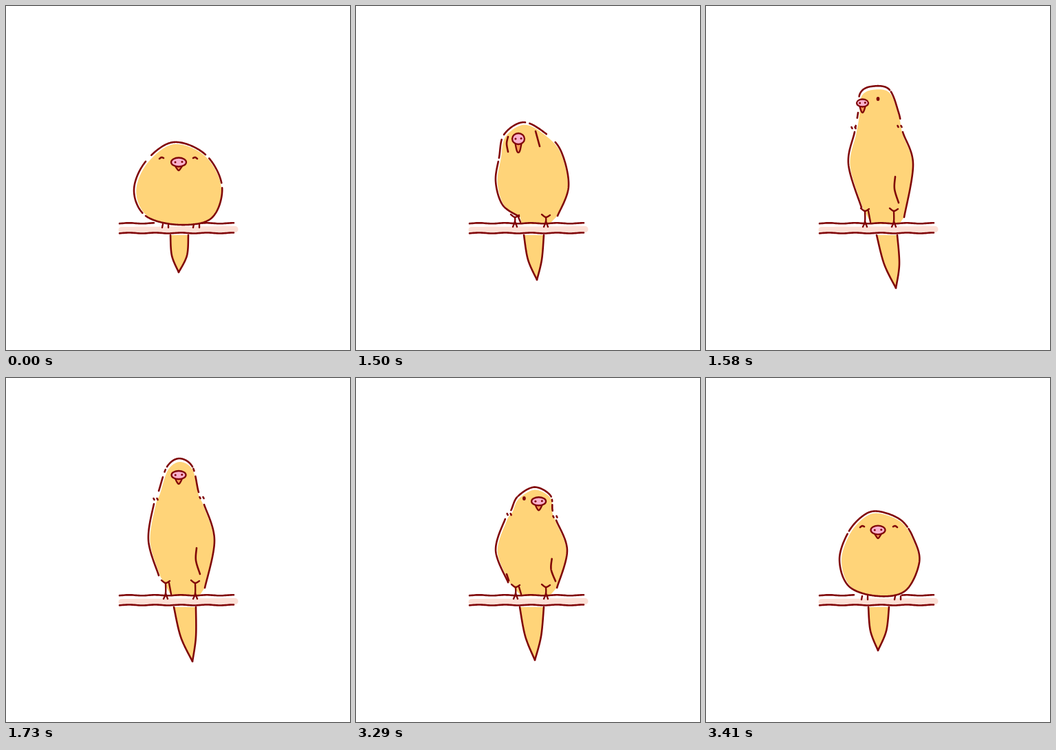
Write an HTML page with a canvas that moves like this. It is 500 px wide and 500 px high and loops after 3.47 s.

```html
<!DOCTYPE html>
<html lang="en">
<head>
<meta charset="utf-8">
<title>Stretching bird</title>
<style>
html, body { margin: 0; height: 100%; overflow: hidden; background: #fff; }
canvas { display: block; width: 100vw; height: 100vh; }
</style>
</head>
<body>
<canvas id="stage" width="500" height="500"></canvas>
<script>
const ctx = document.getElementById('stage').getContext('2d');
const INK = '#800608', YELLOW = '#ffd479', PINK = '#f9b0cd', ORANGE = '#f99d55', PERCH = '#fde0d6';
const LOOP = 3470;

// outline: knots clockwise from the left foot; gaps: breaks in the inked line, in knot units
// tail: top, middle, tip x, tip y, middle, top; beak: x, y, radii, tip length
const ball = {
  closed: true,
  outline: [203,305, 186,268, 203,226, 243,198, 290,216, 314,262, 299,308, 252,318],
  gaps: [0,.15, 2,2.25, 4,4.13, 4.9,5.03],
  tail: [239, 241, 251, 387, 263, 265],
  feet: [232, 277], brows: [226, 275, 221], beak: [251, 227, 11, 6.5, 12]
};
const crouch = {
  outline: [237,306, 213,289, 203,255, 208,220, 215,187, 243,169, 274,184, 298,211, 309,262, 293,305],
  gaps: [2.83,2.97, 3.75,4, 5.1,5.3, 6.12,6.6],
  tail: [244, 250, 263, 398, 270, 273],
  feet: [231, 276, 307], beak: [236, 193, 9, 8, 20],
  marks: [[221,190, 219,200, 221,212], [261,182, 264,193, 267,204]]
};
const side = {
  outline: [226,293, 207,230, 216,183, 221,155, 224,127, 240,117, 266,121, 280,155, 286,183, 301,230, 288,307],
  gaps: [2,2.2, 2.28,2.68, 3,3.8, 6.05,6.15, 7.33,8],
  tail: [248, 259, 276, 410, 281, 278],
  feet: [231, 273, 298], beak: [227.5, 141, 8.5, 5.5, 14],
  tufts: [214, 177, 281, 175], wing: [275, 248], eye: [250, 135]
};
const front = {
  outline: [222,287, 207,236, 215,183, 222,164, 234,129, 252,117, 271,129, 280,166, 288,184, 303,236, 289,305],
  gaps: [2,3, 3.55,3.75, 3.85,4, 6,6.1, 6.2,6.38, 7,8],
  tail: [244, 254, 271, 412, 276, 276],
  feet: [232, 275, 298], beak: [251, 141, 10.5, 6, 13],
  tufts: [217, 176, 284, 174], wing: [277, 247]
};
const turn = {
  outline: [223,294, 206,240, 219,187, 227,172, 236,149, 259,133, 281,147, 284,173, 289,189, 304,240, 290,303],
  gaps: [2,3, 3.95,4.05, 6.1,6.3, 6.4,6.6, 7,8],
  tail: [238, 246, 260, 410, 269, 273],
  feet: [232, 276, 304], beak: [265, 157, 10.5, 6, 13],
  tufts: [224, 179, 287, 183], wing: [283, 254], eye: [245, 152],
  marks: [[221,280, 224,291]]
};
const settle = {
  closed: true,
  outline: [208,303, 194,264, 207,224, 230,199, 252,194, 284,207, 302,234, 310,268, 290,309, 250,317],
  gaps: [1.93,2.05, 5.4,5.5],
  tail: [236, 239, 250, 396, 262, 266],
  feet: [231, 279], brows: [227, 275, 216], beak: [250, 221, 10.5, 6.3, 12]
};

// start time, pose, horizontal and vertical stretch
const steps = [
  [0, ball], [1500, crouch], [1540, side, 1.01, .92], [1580, side], [1730, front],
  [3230, turn], [3290, turn, 1.06, .86], [3350, settle, .95, 1.12], [3410, settle]
];

const pairs = list => list.flatMap((v, i) => i % 2 ? [] : [[v, list[i + 1]]]);

// Points of a smooth curve through the knots, each with its knot position u.
function curve(knots, closed) {
  const n = knots.length, end = closed ? n : n - 1, out = [];
  const knot = i => closed ? knots[(i + n) % n] : knots[Math.min(n - 1, Math.max(0, i))];
  for (let s = 0; s <= end * 40; s++) {
    const u = s / 40, i = Math.min(Math.floor(u), end - 1), t = u - i;
    const [a, b, c, d] = [-1, 0, 1, 2].map(k => knot(i + k));
    const mix = k => b[k] + t / 2 * (c[k] - a[k] +
      t * (2 * a[k] - 5 * b[k] + 4 * c[k] - d[k] + t * (3 * (b[k] - c[k]) + d[k] - a[k])));
    out.push({ u, p: [mix(0), mix(1)] });
  }
  return out;
}

function fill(points, color) {
  ctx.beginPath();
  points.forEach(p => ctx.lineTo(...p));
  ctx.fillStyle = color;
  ctx.fill();
}

function ink(points, width = 2.6, color = INK, gaps = []) {
  let pen = false;
  ctx.beginPath();
  points.forEach(({ u, p }) => {
    const skip = gaps.some(([from, to]) => u > from && u < to);
    if (!skip) pen ? ctx.lineTo(...p) : ctx.moveTo(...p);
    pen = !skip;
  });
  ctx.lineWidth = width;
  ctx.strokeStyle = color;
  ctx.stroke();
}

const stroke = (list, width) => ink(curve(pairs(list)), width);

function dot(x, y, rx, ry) {
  ctx.beginPath();
  ctx.ellipse(x, y, rx, ry, 0, 0, 7);
  ctx.fillStyle = INK;
  ctx.fill();
}

function drawPerch(closed) {
  ctx.fillStyle = '#fff';
  ctx.fillRect(160, 317, 180, 15);
  ink(curve([[168, 325.5], [333, 324.5]]), 9, PERCH);
  for (const y of [315.8, 330]) {
    const points = [];
    for (let x = 165; x <= 331; x += 2) points.push({ u: x, p: [x, y + .5 * Math.sin(x / 6)] });
    ink(points, 2.6, INK, closed && y < 320 ? [[216, 284]] : []);
  }
}

function drawTail([left, midL, tip, tipY, midR, right]) {
  const top = 333, mid = top + .55 * (tipY - top);
  const sides = [[left, top, midL, mid, tip, tipY], [tip, tipY, midR, mid, right, top]]
    .map(s => curve(pairs(s)));
  fill(sides.flat().map(s => s.p), YELLOW);
  sides.forEach(s => ink(s));
}

function drawFeet([left, right, y]) {
  for (const x of [left, right]) {
    if (y) {
      stroke([x - 6, y - 4, x, y, x + 6, y - 3], 2.4);
      stroke([x, y, x, 313, x - 3, 321], 2.4);
      stroke([x, 313, x + 3, 321], 2.4);
    } else {
      stroke([x - 4, 317, x - 5, 322], 2.4);
      stroke([x + 4, 317, x + 4, 322], 2.4);
    }
  }
  if (y) stroke([left + 5, y, left + 8, 314], 2.4);
}

function drawBeak(x, y, w, h, tip) {
  const half = w * .52;
  const lower = curve([[x - half, y + h - 2], [x - half / 2, y + tip - 3], [x, y + tip],
    [x + half / 2, y + tip - 3], [x + half, y + h - 2]]);
  fill(lower.map(s => s.p), ORANGE);
  ink(lower, 2.3);
  ctx.beginPath();
  ctx.ellipse(x, y, w, h, 0, 0, 7);
  ctx.fillStyle = PINK;
  ctx.fill();
  ctx.stroke();
  dot(x - w * .45, y, 1.5, 1.6);
  dot(x + w * .45, y - .5, 1.5, 1.6);
}

function draw(pose, sx = 1, sy = 1) {
  const place = ([x, y]) => [255 + (x - 255) * sx, y < 316 ? 316 + (y - 316) * sy : y];
  const placed = list => pairs(list).map(place).flat();
  const { closed, outline, gaps, tail, feet, beak, brows, tufts, wing, eye, marks = [] } = pose;
  const body = curve(pairs(outline).map(place), closed);
  const inner = body.map(({ p: [x, y] }) => [256.8 + (x - 256) * .965, 317 + (y - 317) * .975]);

  ctx.fillStyle = '#fff';
  ctx.fillRect(0, 0, 500, 500);
  fill(closed ? inner : [...inner, [280, 318], [241, 318]], YELLOW);
  drawPerch(closed);
  drawTail(tail);
  ink(body, 2.6, INK, pairs(gaps));
  drawFeet(feet);
  marks.forEach(m => stroke(placed(m)));
  if (brows) {
    const [left, right, y] = brows;
    for (const [x, k] of [[left, 1], [right, -1]]) {
      stroke(placed([x - 3 * k, y + 1, x, y - 1, x + 3 * k, y]));
    }
  }
  if (tufts) {
    for (const [x, y] of pairs(placed(tufts))) {
      for (const d of [-2.5, 2.5]) stroke([x + d, y - 1, x + d + 1, y + 1]);
    }
  }
  if (wing) {
    const [x, y] = wing;
    stroke(placed([x, y, x - 1, y + 18, x + 5, y + 38]));
  }
  if (eye) dot(...place(eye), 2.4, 3);
  drawBeak(...place(beak), ...beak.slice(2));
}

ctx.lineCap = ctx.lineJoin = 'round';
function tick() {
  const t = performance.now() % LOOP;
  const [, ...step] = steps.findLast(s => s[0] <= t);
  draw(...step);
  requestAnimationFrame(tick);
}
tick();
</script>
</body>
</html>
```
